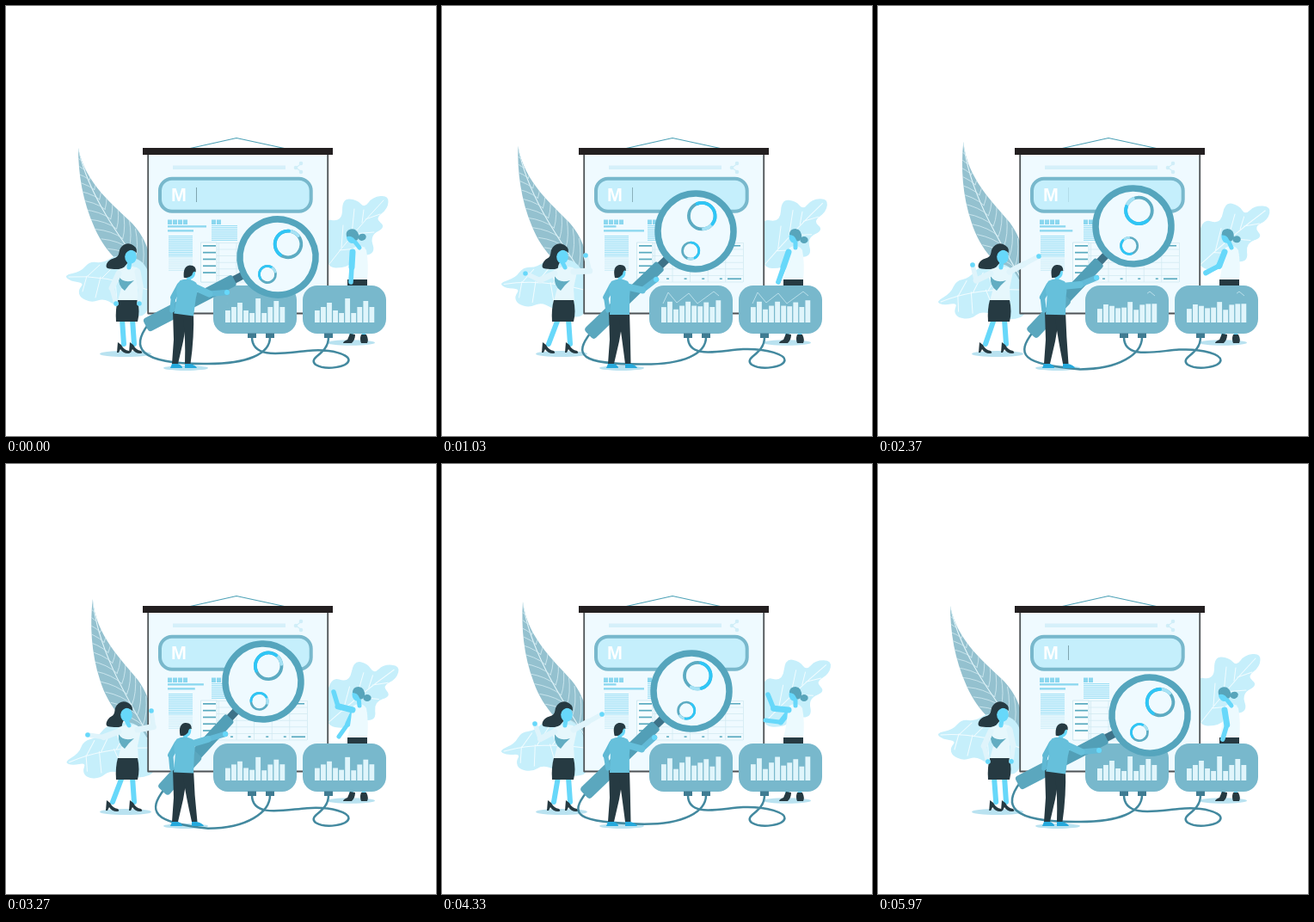
Animation of 500x500 px, one loop 6 s. Source, as an HTML page with a canvas:

```html
<!DOCTYPE html>
<html lang="en">
<head>
<meta charset="utf-8">
<title>Data research</title>
<style>
html, body { margin: 0; width: 100%; height: 100%; overflow: hidden; background: #fff; }
canvas { display: block; width: 500px; height: 500px; }
</style>
</head>
<body>
<canvas id="stage" width="500" height="500"></canvas>
<script>
const c = document.getElementById('stage').getContext('2d');
const LOOP = 6000, POSES = [0, 1030, 2370, 3270, 4330, 5130];
const DARK = '#263a42', SKIN = '#67d8fa', WHITE = '#e6f7fc', TEAL = '#78b8cc', CABLE = '#43899f', PALE = '#c6effb';
let now = 0;

const clamp = (v, a = 0, b = 1) => Math.min(b, Math.max(a, v));
const wave = period => (1 - Math.cos(now / period * 2 * Math.PI)) / 2;

// Smooth periodic curve through one value per pose
function key(...v) {
  const n = POSES.length;
  const val = j => v[(j + n) % n];
  const time = j => POSES[(j + n) % n] + LOOP * Math.floor(j / n);
  const slope = j => (val(j + 1) - val(j - 1)) / (time(j + 1) - time(j - 1));
  let i = n - 1;
  while (POSES[i] > now) i--;
  const d = time(i + 1) - time(i), u = (now - time(i)) / d, u2 = u * u, u3 = u2 * u;
  return (2 * u3 - 3 * u2 + 1) * val(i) + (u3 - 2 * u2 + u) * d * slope(i)
    + (3 * u2 - 2 * u3) * val(i + 1) + (u3 - u2) * d * slope(i + 1);
}

function fill(color, path) {
  c.fillStyle = color;
  c.fill(typeof path === 'string' ? new Path2D(path) : path);
}
function line(color, width, path) {
  c.strokeStyle = color;
  c.lineWidth = width;
  c.stroke(typeof path === 'string' ? new Path2D(path) : path);
}
function box(color, x, y, w, h) {
  c.fillStyle = color;
  c.fillRect(x, y, w, h);
}
function round(x, y, w, h, r) {
  const p = new Path2D();
  p.roundRect(x, y, w, h, r);
  return p;
}
function oval(color, x, y, rx, ry = rx) {
  const p = new Path2D();
  p.ellipse(x, y, rx, ry, 0, 0, 7);
  fill(color, p);
}
function arc(color, width, x, y, r, from = 0, to = 2 * Math.PI) {
  const p = new Path2D();
  p.arc(x, y, r, from, to);
  line(color, width, p);
}
function turn(x, y, deg, draw) {
  c.save();
  c.translate(x, y);
  c.rotate(deg * Math.PI / 180);
  c.translate(-x, -y);
  draw();
  c.restore();
}
function blob(pts) {
  const p = new Path2D();
  const mid = i => {
    const a = pts[i % pts.length], b = pts[(i + 1) % pts.length];
    return [(a[0] + b[0]) / 2, (a[1] + b[1]) / 2];
  };
  p.moveTo(...mid(pts.length - 1));
  pts.forEach((q, i) => p.quadraticCurveTo(...q, ...mid(i)));
  p.closePath();
  return p;
}

// Two-part limb with an elbow pushed to one side
function arm(s, h, half, bend, width, upper, lower) {
  const dx = h[0] - s[0], dy = h[1] - s[1], d = Math.hypot(dx, dy);
  const out = Math.sqrt(Math.max(0, half * half - d * d / 4)) * bend / d;
  const e = [(s[0] + h[0]) / 2 - dy * out, (s[1] + h[1]) / 2 + dx * out];
  line(lower, width - 1.5, `M${e}L${h}`);
  line(upper, width, `M${s}L${e}`);
}

function leaves() {
  const s = wave(LOOP);
  turn(164, 312, 6.5 * s, () => {
    const leaf = new Path2D('M84 165C92 207 126 232 147 253C167 275 170 298 170 320C140 310 116 288 103 258C89 227 84 195 84 165Z');
    fill('#94c1cf', leaf);
    c.save();
    c.clip(leaf);
    line('#e2f5fa', 1.1, 'M84 165C95 220 134 272 168 318');
    for (let i = 1; i < 13; i++) {
      const u = i / 13, x = 84 + 82 * u ** 1.25, y = 168 + 148 * u;
      line('#d3ebf2', .8, `M${x} ${y}q-12 -9 -32 -11M${x} ${y}q4 -14 0 -34`);
    }
    c.restore();
  });
  turn(375, 297, 11 * s, () => {
    fill(PALE, blob([[366, 247], [391, 251], [391, 224], [408, 225], [417, 235], [426, 222], [445, 220],
      [444, 236], [429, 247], [442, 257], [423, 267], [430, 288], [409, 291], [398, 304], [370, 305]]));
    line('#f2fcff', 1, 'M376 300Q405 262 439 226M390 281l2 -26M402 266l3 -30M414 252l2 -15M388 284l29 -3M403 265l25 -2M418 248l17 -6');
  });
  turn(165, 329, -20 * s, () => {
    fill(PALE, blob([[67, 313], [87, 309], [97, 297], [113, 299], [130, 288], [168, 298], [168, 360], [143, 361],
      [126, 347], [113, 340], [100, 345], [86, 339], [84, 330], [91, 322], [75, 320]]));
    line('#f2fcff', 1, 'M73 315Q115 312 165 330M95 314l14 -13M112 316l18 -18M94 314l-5 18M110 315l-6 24M127 318l2 26M130 319l18 -16');
  });
}

function board() {
  line('#4ea2b7', 1.2, 'M212 166L268 153.5L326 166');
  box('#effaff', 165, 170, 210, 188);
  line('#4e5356', 1.8, 'M165.2 170V357.5H374.2V170');
  box('#231f20', 159, 165, 221, 8);
  box('#d5f0fa', 194, 185.5, 131, 4.5);
  line('#d0eef8', 1.3, 'M344 183L337 188L344 193');
  [[343, 183], [337, 188], [343, 193]].forEach(p => oval('#d0eef8', ...p, 2.3));
  const search = round(179, 200.7, 175.7, 38, 14);
  fill('#c5effc', search);
  line(TEAL, 4, search);
  c.fillStyle = '#fff';
  c.font = 'bold 21.5px "Liberation Sans", Arial, sans-serif';
  c.fillText('M', 192, 227);
  c.globalAlpha = clamp(key(1, .85, .25, 0, 0, .3));
  box('#7fa5b0', 221, 211, 1, 17);
  c.globalAlpha = 1;

  for (let i = 0; i < 4; i++) box('#8bd7ef', 188 + i * 6, 248.5, 5, 5.5);
  for (let i = 0; i < 2; i++) box('#8bd7ef', 239 + i * 6, 248.5, 5, 5.5);
  const swap = clamp(1.3 * wave(3000));
  box('#8bd7ef', 188, 255.2, 45 - 30.5 * swap, 2.3);
  box('#8bd7ef', 188, 260.2, 30 + 17 * swap, 2.3);
  for (let i = 0; i < 20; i++) box(i < 12 ? '#9cdff5' : '#cfeef8', 189, 267 + i * 2.1, 28, 1.1);
  for (let i = 0; i < 9; i++) box('#9cdff5', 239, 255 + i * 2.1, 30, 1.1);
  table();
}

function table() {
  for (let i = 0; i < 7; i++) box('#d3eaf2', 227, 275 + i * 7.6, 123, .8);
  for (let x = 247; x < 352; x += 20.6) box('#d3eaf2', x, 275, .8, 46);
  box('#f7fdff', 227, 275, 18, 46);
  line('#c5e4ee', .8, 'M227 275h18v46h-18z');
  for (let i = 0; i < 5; i++) box('#59aabf', 229, 278 + i * 7.8, 15, 1.7);
  for (let i = 0; i < 4; i++) box('#59aabf', 261 + i * 20.6, 316.4, 3, 1.5);
  box('#59aabf', 332, 316.4, 16, 1.7);
  box('#59aabf', 335, 278, 12, 1.5);
}

const LOW = [14, 18, 23, 14, 11, 28, 11, 18, 25, 18];
const HIGH = [19, 26, 13, 21, 28, 17, 21, 25, 16, 28];
const TREND = 'M257 346L263 333L273 345L287 334L297 346L316 332L322 337', TREND_LEN = 97;

function chart(dx) {
  c.save();
  c.translate(dx, 0);
  fill(TEAL, round(241, 325, 97, 56, 17));
  const mix = wave(3000);
  LOW.forEach((low, i) => {
    const h = low + (HIGH[i] - low) * mix;
    box('#e0f5fb', 255 + i * 7.05, 368 - h, 5.8, h);
  });
  const end = clamp(now / 1000), start = clamp((now - 1400) / 1130);
  if (end > start) {
    c.lineCap = 'butt';
    c.setLineDash([(end - start) * TREND_LEN, 300]);
    c.lineDashOffset = -start * TREND_LEN;
    line('#b9dfea', 1, TREND);
  }
  c.restore();
}

function glassPose() {
  const x = key(316, 295, 297, 299, 290, 300), y = key(292, 262, 256, 253, 264, 273);
  const deg = key(27.5, 44, 46.5, 47.4, 44, 38.3), a = deg * Math.PI / 180;
  return { x, y, deg, end: [x - 170 * Math.cos(a), y + 170 * Math.sin(a)] };
}

function cables(end) {
  const [x, y] = end, s = wave(LOOP), mid = 416 + 8 * s * s;
  line(CABLE, 2.5, `M${x} ${y}C${x - 19} ${y + 25} ${x - 15} 417 235 ${mid}C280 ${mid} 307 405 307 385`);
  const dip = clamp(key(1, 0, .3, .6, 0, .2));
  line(CABLE, 2.5, `M286 385C286 412 325 ${400 + 3 * dip} 350 ${399 + 2 * dip}C380 398 399 406 398.5 412C397 420 372 424 360 417C350 408 375 406 375 385`);
  [286, 307, 375].forEach(px => box('#3f7b91', px - 5, 380.5, 10, 5.5));
}

function ring(x, y, r, width, from) {
  arc('#5cabc2', width, x, y, r);
  arc('#a6e2f5', width, x, y, r, from + 2.6, from + 3.4);
  arc('#2fc6f6', width, x, y, r, from, from + 2.6);
}

function glass(g) {
  c.save();
  c.translate(g.x, g.y);
  c.rotate(-g.deg * Math.PI / 180);
  box('#3d7288', -62, -4.5, 18, 9);
  fill('#529fb7', round(-150, -7, 93, 14, 3));
  fill('#5ba7be', round(-173, -8.5, 60, 17, 4));
  oval('#effaff', 0, 0, 44);
  arc('#55a5bd', 7.5, 0, 0, 44);
  const spin = (200 + now * .12 - 75 + g.deg) * Math.PI / 180;
  ring(17.6, -7.8, 15.3, 3.8, spin);
  ring(-19.9, 12.2, 9.6, 2.7, spin + .4);
  c.restore();
}

function leftWoman() {
  const head = key(144, 139, 144, 139, 144, 139), foot = key(134, 121, 122, 121, 127, 133);
  const bend = clamp(key(1, -1, -1, -1, -1, -1), -1, 1);
  line(SKIN, 6, `M135 364L${foot + 3} 393`);
  line(SKIN, 6, 'M147 364L149 393');
  [foot, 148].forEach(x => fill(DARK, `M${x - 4} 391l4 3q3 6 9 7q3 3 -1 3q-6 0 -9 -5l-2 4h-2z`));
  fill(DARK, blob([[head + 8, 280], [head - 3, 275], [head - 12, 281], [head - 13, 292], [119, 295], [115, 305],
    [126, 306], [135, 306], [head - 4, 301], [head + 3, 290]]));
  fill(WHITE, 'M132 306Q142 301 152 304Q158 307 156 314L153 328L154 343H130L134 328L128 314Q128 308 132 306Z');
  fill('#62adc2', 'M131 314Q136 323 149 319Q143 324 138 331Q130 326 131 314Z');
  line(SKIN, 5, `M${head} 296L143 304`);
  oval(SKIN, head + 1, 291.5, 6.8, 8.3);
  fill(DARK, `M${head - 7} 292Q${head - 8} 281 ${head + 1} 278Q${head + 9} 279 ${head + 8} 287Q${head + 4} 283 ${head} 284Q${head - 5} 286 ${head - 7} 292Z`);
  fill(DARK, 'M130 342H153Q156 355 153 367H128Q127 352 130 342Z');
  const hands = [
    [[131, 311], [key(128, 97, 110, 95, 108, 94), key(346, 311, 301, 315, 302, 319)], bend],
    [[153, 309], [key(155, 167, 187, 169, 186, 170), key(346, 290, 291, 287, 291, 289)], -bend]
  ];
  hands.forEach(([s, h, b]) => {
    arm(s, h, 18.7, b, 7, '#dff4fb', '#dff4fb');
    oval(SKIN, ...h, 2.8);
  });
}

function rightWoman() {
  const head = key(404, 411, 407, 410, 411, 410);
  const tilt = key(-18, 0, -4, 0, 0, 0);
  line(SKIN, 4.5, 'M402 375L401 387M416 375V386');
  fill(DARK, 'M400 381l6 1q0 6 -4 10h-10q0 -2 5 -4zM413 382h6q3 6 1 10h-7q-2 -5 0 -10z');
  const low = [key(401, 391, 381, 387, 376, 378), key(321, 321, 311, 317, 298, 313)];
  arm([405, 286], low, 18, -1, 6.5, SKIN, SKIN);
  fill('#ecfafe', 'M404 281Q414 276 419 284Q422 300 420 319H397Q401 302 402 288Z');
  line(SKIN, 5, `M${head} 272L411 281`);
  box(DARK, 397, 318, 23, 20);
  const high = [key(401, 391, 381, 381, 379, 380), key(321, 321, 310, 265, 268, 266)];
  arm([403, 286], high, 17.5, -1, 7, SKIN, SKIN);
  turn(head, 270, tilt, () => {
    oval(SKIN, head - 2, 268, 5.5, 7.5);
    fill('#58a5bb', `M${head - 7} 266Q${head - 7} 259 ${head} 259Q${head + 8} 260 ${head + 7} 270Q${head + 3} 276 ${head + 1} 272Q${head - 1} 266 ${head - 7} 266Z`);
    oval('#58a5bb', head + 10, 272, 4.7, 4);
  });
}

function man() {
  const lean = key(7.5, 0, 1.5, 2, -.5, -.5), foot = key(211, 216, 218, 219, 216, 215);
  fill(DARK, 'M194 355H212L206 390L200 416H193L195 388Z');
  fill(DARK, `M203 355H218Q219 385 ${foot + 3.5} 416H${foot - 3}Q209 385 206 364Z`);
  fill('#25a9dc', `M193 416h7q5 2 5 5h-14zM${foot - 3} 416h6q7 2 8 5h-14z`);
  const left = [198 + lean * .55, 325], right = [213 + lean * .6, 326];
  arm(left, [193, 354], 15.5, 1, 7, '#60b9d4', '#60b9d4');
  turn(206, 360, lean, () => {
    line(SKIN, 5, 'M207 312V321');
    fill('#66c0db', 'M197 320Q207 315 216 320Q220 325 218 338L218 359H195L196 338Q192 328 197 320Z');
    oval(SKIN, 208, 310, 5.5, 7);
    fill(DARK, 'M201 316Q198 303 206 301Q214 300 214 308Q211 306 210 312Q206 317 201 316Z');
  });
  const hand = [key(257, 249, 254, 255, 247, 252), key(333, 318, 316, 314, 318, 320)];
  arm(right, hand, 21, .85, 8, '#66c0db', '#62bad7');
  oval(SKIN, ...hand, 3);
}

function draw() {
  c.clearRect(0, 0, 500, 500);
  c.lineCap = c.lineJoin = 'round';
  leaves();
  board();
  oval('#b9e2f0', 139, 404.5, 30, 3.6);
  oval('#b9e2f0', 209, 421, 26, 3);
  oval('#b9e2f0', 401, 391.5, 28, 3.3);
  rightWoman();
  chart(0);
  chart(104);
  leftWoman();
  const g = glassPose();
  cables(g.end);
  glass(g);
  man();
}

const begin = performance.now();
function frame() {
  now = (performance.now() - begin) % LOOP;
  draw();
  requestAnimationFrame(frame);
}
frame();
</script>
</body>
</html>
```
